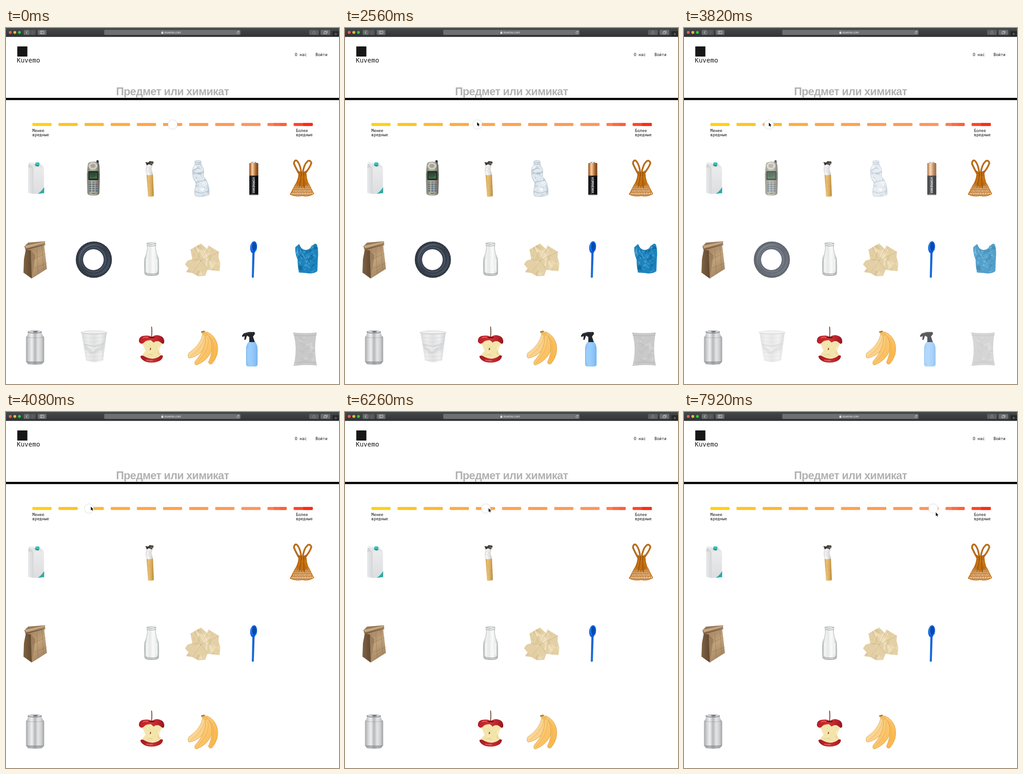
An HTML page with a canvas that plays this animation: 724 by 773 pixels, repeating every 8000 ms.

```html
<!DOCTYPE html>
<html lang="ru">
<head>
<meta charset="utf-8">
<title>Kuvemo</title>
<style>
html, body { margin: 0; width: 100%; height: 100%; overflow: hidden; background: #fff; }
canvas { display: block; width: 724px; height: 773px; }
</style>
</head>
<body>
<canvas id="stage"></canvas>
<script>
const W = 724, H = 773, LOOP = 8000;
const SANS = '"Liberation Sans", sans-serif';
const MONO = '"DejaVu Sans Mono", monospace';
const ratio = window.devicePixelRatio || 1;
const stage = document.getElementById('stage');
let g;

function prepare(canvas) {
  canvas.width = W * ratio;
  canvas.height = H * ratio;
  const ctx = canvas.getContext('2d');
  ctx.scale(ratio, ratio);
  return ctx;
}

function layer(...painters) {
  const canvas = document.createElement('canvas');
  g = prepare(canvas);
  painters.forEach(paint => paint());
  return canvas;
}

// Drawing helpers
const fill = (d, color) => { g.fillStyle = color; g.fill(new Path2D(d)); };
const line = (d, color, width = 1) => {
  g.strokeStyle = color;
  g.lineWidth = width;
  g.lineCap = g.lineJoin = 'round';
  g.stroke(new Path2D(d));
};
const box = (x, y, w, h, r, color) => {
  g.fillStyle = color;
  g.beginPath();
  g.roundRect(x, y, w, h, r);
  g.fill();
};
const oval = (x, y, rx, ry, color, turn = 0) => {
  g.fillStyle = color;
  g.beginPath();
  g.ellipse(x, y, rx, ry, turn, 0, 7);
  g.fill();
};
const text = (s, x, y, font, color, align = 'left', spacing = 0) => {
  g.font = font;
  g.fillStyle = color;
  g.textAlign = align;
  g.letterSpacing = spacing + 'px';
  g.fillText(s, x, y);
  g.letterSpacing = '0px';
};
const blend = (x0, y0, x1, y1, ...colors) => {
  const grad = g.createLinearGradient(x0, y0, x1, y1);
  colors.forEach((c, i) => grad.addColorStop(i / (colors.length - 1), c));
  return grad;
};
const across = (x0, x1, ...colors) => blend(x0, 0, x1, 0, ...colors);
const down = (y0, y1, ...colors) => blend(0, y0, 0, y1, ...colors);

function inside(d, paint) {
  g.save();
  g.clip(new Path2D(d));
  paint();
  g.restore();
}

function random(seed) {
  return () => (seed = (seed * 16807) % 2147483647) / 2147483647;
}

// Fills a shape and scatters soft folds over it
function crumple(d, base, [x, y, w, h], folds, count, seed, size = 16) {
  const rnd = random(seed);
  fill(d, base);
  inside(d, () => {
    for (let i = 0; i < count; i++) {
      const cx = x + rnd() * w, cy = y + rnd() * h;
      const p = () => (rnd() - .5) * size;
      fill(`M${cx} ${cy}l${p()} ${p()}l${p()} ${p()}l${p()} ${p()}z`, folds[i % folds.length]);
    }
  });
}

// Page
function browser() {
  box(0, 0, W, 19, 0, down(0, 19, '#45494a', '#303435'));
  box(0, 18.4, W, .8, 0, '#17191a');
  ['#fc5b57', '#e5bf3c', '#34c748'].forEach((c, i) => oval(9.2 + i * 10, 9.6, 3.1, 3.1, c));
  const key = '#686c6d', ink = '#e8e9e9', dim = '#8d9091';
  box(38.5, 4, 13, 11, 2, key);
  box(52, 4, 12.5, 11, 2, '#535758');
  box(69, 4, 19, 11, 2, key);
  line('M46 7l-2.4 2.5L46 12', ink);
  line('M57.2 7l2.4 2.5L57.2 12', '#777b7c', .9);
  line('M75 6.8h7.5v5.4H75zM77.7 6.8v5.4', ink, .8);
  box(213.5, 4, 296.5, 11, 2, '#6c7071');
  box(337.8, 9, 4.4, 3.4, .6, ink);
  line('M338.7 9V8a1.3 1.3 0 0 1 2.6 0v1', ink, .7);
  text('kuvemo.com', 344.5, 11.8, '6.3px ' + SANS, '#f2f2f2');
  line('M506.2 8.2a2.4 2.4 0 1 0 .6 1.6M506.5 6.5v1.9h-1.9', ink, .7);
  box(659, 4, 21, 11, 2, '#5c6061');
  box(684, 4, 21, 11, 2, key);
  line('M668 8.5h-1.5v4h6v-4H671M669.5 10.5V6.3M668.2 7.4l1.3-1.2 1.3 1.2', dim, .7);
  line('M691.5 8.5h5v4h-5zM693.5 8V6.8h5v4h-1', ink, .7);
  box(710, 7, 14, 12, 0, '#26292a');
  line('M717 10.3v5.4M714.3 13h5.4', '#8b8e8f', .8);
}

function page() {
  const label = '500 8.6px ' + MONO;
  box(24.5, 40, 22, 22, 0, '#171717');
  text('Kuvemo', 23.5, 75, '14px ' + MONO, '#1c1c1c');
  text('О нас', 628, 61, label, '#111');
  text('Войти', 673, 61, label, '#111');
  text('Предмет или химикат', 362, 146, 'bold 24px ' + SANS, '#b1b1b1', 'center', -.7);
  box(0, 151.7, W, 4.8, 0, '#000');
  const tones = ['#ffd016', '#fcc425', '#fab834', '#fbac42', '#fba64b', '#fba251',
    '#fb9d55', '#fa9b59', '#fb965e', '#fb7c50', '#fb4427'];
  tones.forEach((c, i) => box(57.3 + i * 56.8, 206.2, 41.8, 6.5, 1.6, c));
  box(582, 206.2, 14, 6.5, 0, '#fa6b43');
  box(596, 206.2, 14.3, 6.5, [0, 1.6, 1.6, 0], '#fc5f39');
  box(646, 206.2, 21.1, 6.5, [0, 1.6, 1.6, 0], '#fb2c15');
  text('Менее', 57.3, 226, label, '#111');
  text('вредные', 57.3, 234.8, label, '#111');
  text('Более', 630.5, 226, label, '#111');
  text('вредные', 630.5, 234.8, label, '#111');
}

// Objects
function carton() {
  fill('M48 303L60 304V360.5L48 358Z', across(48, 60, '#e9eaeb', '#d4d6d8'));
  fill('M60 304L82.5 302.5V358.5L60 360.5Z', down(303, 360, '#ebebec', '#dcdddf'));
  fill('M50 292.5L60 304L48 303Z', '#d0d2d4');
  fill('M50 294L75 295L82.5 302.5L60 304Z', '#e3e4e6');
  fill('M49.5 291L62 292V295L50 294.5Z', '#f0f0f1');
  fill('M83 345.5V358.5L69 360Q77 355 83 345.5Z', '#2eaaa3');
  oval(67.8, 297, 4.6, 3.4, '#188e88', .2);
  box(63.8, 291.8, 9, 6, 2.4, '#3dc0b6');
}

function phone() {
  box(196.5, 287, 5, 15, 2.2, '#2c333d');
  fill('M178 296Q179 290 190 290Q202 290 203 298L204 319L203 359Q202 364 190 364Q178 364 177 359L176 318Z',
    across(176, 204, '#77786e', '#b4b3a4', '#a5a497', '#5e6059'));
  oval(189, 299.5, 9.8, 7.8, '#d3d1c4');
  oval(189, 299.5, 6.4, 5, '#b6b4a6');
  for (let i = 0; i < 9; i++) oval(186.5 + i % 3 * 2.5, 297.5 + (i / 3 | 0) * 2, .6, .6, '#5a5b55');
  box(179, 310.5, 22, 20, 2.5, '#25292a');
  box(181.5, 313.5, 17, 13.5, 1, down(313, 327, '#28482f', '#46704b'));
  line('M183.5 317h10M183.5 320h12M183.5 323h8', '#183620', .8);
  for (let i = 0; i < 15; i++) {
    const row = i / 3 | 0;
    const c = row ? '#4c5d6d' : ['#4d7e5c', '#56708a', '#b2504a'][i];
    oval(183 + i % 3 * 7, 334.5 + row * 4.7, 2.5, 1.6, c);
    oval(183 + i % 3 * 7, 334 + row * 4.7, 1.2, .5, '#a9b7c1');
  }
  box(186, 358.5, 8, 1.5, .7, '#5f6058');
}

function cigarette() {
  fill('M305.5 318L319.5 318L321.5 365Q315 367 309 366Z', across(305, 321, '#cf9f50', '#e8c078', '#dcae60', '#b98a3e'));
  const rnd = random(7);
  for (let i = 0; i < 30; i++) box(308 + rnd() * 11, 322 + rnd() * 41, 1, 1, 0, '#b7873f80');
  fill('M305 297L319 296L316.5 306L319.5 318Q312 321 305.5 319L303.5 308Z', across(303, 319, '#d2d3d6', '#f7f7f8', '#e5e6e7', '#c6c8cb'));
  line('M307 302l7 4-5 4 7 5', '#c9cbce', .8);
  crumple('M303 291L309 292L312 289L320 290L321 293L317 298L311 296L306 298Z', '#45403d',
    [303, 288, 18, 11], ['#1c1917', '#8e8783', '#c6c0bb', '#635248'], 24, 12, 6);
}

function crushed() {
  const d = 'M411 289Q417 286 424 289L424 297Q430 303 430 312L429 322L436 331Q443 345 441.5 362Q427 368 412 365Q408 357 412 345L413 336L407 326Q404 311 407 303L411 297Z';
  crumple(d, '#dfe7ee', [404, 292, 38, 74], ['#ffffffb0', '#b8c5d080', '#edf3f7c0', '#94a8b860'], 80, 31, 16);
  line(d, '#a9b8c5', .8);
  line('M411 292h13M411 296h13M407 313l12 3 11-4M413 336l20-6M411 355l14 4 16-6', '#8da1b1', .8);
}

function battery() {
  box(533.5, 290.5, 10.5, 5, 1.5, across(533, 544, '#777', '#e9e9e9', '#888'));
  box(529, 293, 19.5, 30, [2, 2, 0, 0], across(529, 548, '#8a5024', '#c98347', '#f6cfa6', '#e3a873', '#b67840', '#8f5525', '#7a4218'));
  box(529, 320.5, 19.5, 42.5, [0, 0, 2, 2], across(529, 548, '#0b0b0c', '#2a2b2e', '#111214', '#050505'));
  box(530, 361, 17.5, 2, 1, '#77797b');
  g.save();
  g.translate(536.3, 323.5);
  g.rotate(Math.PI / 2);
  text('VORNEMIX', 0, 0, 'bold 6.6px ' + SANS, '#f4f4f4');
  g.restore();
}

function net() {
  const body = 'M636 310Q644 316 653 309Q653 327 658 338L669 360Q657 367 644 364Q630 367 618 361L630 338Q637 325 636 310Z';
  const dark = '#96500b', warm = '#cb7615';
  const loops = 'M637 316Q629 302 626 294Q627 286 632 288Q640 295 642 316M650 316Q661 303 664 293Q662 286 656 289Q647 297 645 316';
  line(loops, dark, 3.6);
  line(loops, warm, 2);
  inside(body, () => {
    fill('M635 308H654V326L658 338L644 346L631 338Z', '#b0620f');
    for (let i = -14; i <= 14; i++) {
      line(`M${644 + i * 4} 366L${644 + i * 1.6 + 12} 322`, dark, 1.3);
      line(`M${644 + i * 4} 366L${644 + i * 1.6 - 12} 322`, warm, 1.3);
    }
    line('M639 310Q641 326 632 344M645 312Q644 330 643 348M650 310Q648 326 656 344', warm, 1.8);
    line('M642 312Q642 328 637 346M648 312Q646 330 649 348', dark, 1.2);
  });
  line('M630 338L618 361Q630 367 644 364Q657 367 669 360L658 338', warm, 1.6);
}

function paperBag() {
  fill('M43 481L83 472L89 523L56 544L38 531Z', blend(45, 480, 88, 530, '#a48260', '#c0a27c', '#a3835f'));
  fill('M43 481L54 483L56 544L38 531L39 502Z', blend(39, 500, 57, 500, '#7d6142', '#5f472f'));
  fill('M54 483L64 494L56 544Z', '#8a6c4a90');
  line('M67 480L70 534M58 502L86 490M60 522L88 511M78 474L82 526', '#7a5d3e66', 1);
  fill('M40 474L48 466L85 463L85 470L46 482L42 481Z', '#97785a');
  fill('M41 473L85 463.5L84 467L44 478Z', '#c5a881');
  line('M43 481L85 471', '#5b4229', 1);
}

function tire() {
  oval(191, 503, 39.3, 39.5, '#323943');
  for (let i = 0; i < 100; i++) {
    const a = i * Math.PI / 50, c = Math.cos(a), s = Math.sin(a);
    line(`M${191 + c * 36} ${503 + s * 36}L${191 + c * 38.5} ${503 + s * 38.5}`, i % 2 ? '#262c35' : '#424a55', 1);
  }
  oval(192, 503, 34.5, 35, blend(165, 475, 216, 532, '#566272', '#353d49', '#465161'));
  oval(191.5, 503, 29.5, 30, '#2f3743');
  oval(191, 503, 28, 28.5, '#465060');
  oval(190, 503, 24.6, 24.8, '#2b323d');
  oval(190, 503, 22.8, 23, '#d5d8dc');
  oval(190, 503, 21.6, 21.8, '#fff');
}

function glass() {
  const d = 'M306.5 467Q316 464 326 467L325 478Q326 490 331 499Q332.5 506 332 533Q331 538 317 538Q302 538 301.5 533Q300 507 302 499Q307 489 307.5 478Z';
  fill(d, across(301, 332, '#b9bdbe', '#f0f1f1', '#e7e9e9', '#fafafa', '#ecefef', '#b6bbbc'));
  line(d, '#9ba1a2', .8);
  line('M307 468Q316 471 325.5 468M307.5 472Q316 475 325 472', '#8b9192', 1);
  line('M306 501V528M328 502V527', '#ffffffcc', 2);
  line('M303 532Q317 536 331 532M304 535Q317 538 330 535', '#82898a', 1);
}

function crumpled() {
  const d = 'M410 476L424 468L437 480L440 472L463 486L462 497L466 512L464 528L438 525L433 538L418 539L405 532L391 530L397 522L389 513L395 505L405 502L401 481Z';
  crumple(d, '#e4d0a6', [390, 468, 75, 71], ['#efe0bcb0', '#d3bd9080', '#dcc799a0', '#f4e8c8a0', '#c2aa7a50'], 45, 44, 32);
  line('M410 476L424 505L405 502M424 505L463 486M424 505L438 525M424 505L405 532M437 480L424 505', '#b9a17280', .9);
}

function spoon() {
  fill('M535.6 486H540.4L538.8 541Q536.7 544 534.5 541Z', across(534, 540, '#0751c4', '#1d76ea', '#0649af'));
  oval(538.3, 476, 7.5, 13, blend(531, 470, 546, 480, '#176fe6', '#0756cb'), .12);
  oval(538.8, 474.5, 4.6, 9, '#0649b1', .12);
  line('M535 468Q533 477 536 484', '#3d91fa', 1.1);
  oval(543.2, 485.2, 1.3, 1.8, '#d9ebff', .4);
}

function blueBag() {
  const d = 'M629 476L637 469Q642 482 651 482Q661 482 665 473L672 468L676 470Q680 485 678 500L677 528Q668 535 652 532L637 531Q634 518 634 503Q628 490 629 476Z';
  crumple(d, '#1d83bc', [628, 468, 52, 65], ['#49a8d9b0', '#0d649b90', '#2e95caa0', '#8acbeb60', '#0a568880'], 75, 71, 20);
  line('M637 470Q642 483 651 483Q661 483 665 473', '#0c5f96', 1);
}

function can() {
  const d = 'M48 659L77 659L79 666L83 672V724L78 730Q63 732 48 730L43.5 724V672L47 666Z';
  fill(d, across(43, 83, '#a4a6a8', '#cfd1d3', '#eeefef', '#b4b6b9', '#e4e5e6', '#cfd1d3', '#a2a4a7'));
  fill('M43.5 724H83L78 730Q63 732 48 730Z', '#85888b88');
  line('M44 671Q63 675 82 671M44 724Q63 728 82 724', '#8b8e91aa', .8);
  oval(62.5, 660, 15.5, 3.3, '#77797c');
  oval(62.5, 659.6, 14, 2.2, '#d4d6d8');
  oval(64, 659.6, 5, 1.1, '#4b4d50');
}

function cup() {
  const d = 'M164 661L219 661L211 722Q192 729 174 722Z';
  fill(d, across(164, 219, '#d8d9da', '#ececec', '#e0e1e2', '#efefef', '#d0d1d2'));
  inside(d, () => {
    fill('M169 684L191 691L214 681L210 700L184 708L172 697Z', '#c2c3c560');
    fill('M175 690L193 694L204 690L189 703Z', '#f6f6f6a0');
    for (let i = 0; i < 7; i++) line(`M166 ${671 + i * 8}Q190 ${677 + i * 8} 217 ${670 + i * 8}`, '#bcbec060', .9);
  });
  oval(191.5, 661, 28.8, 4.2, '#cbcccd');
  oval(191.5, 660.6, 27.2, 3, '#efefef');
}

function apple() {
  line('M316 674Q318 660 316.5 649', '#5e3923', 1.7);
  crumple('M291 681L304 675H332L343 683L336 691L333 702L340 714L318 719L293 714L303 701L299 690Z', '#f3e4ac',
    [291, 676, 52, 42], ['#fff4c9b0', '#e3c97a80', '#f8e9b4b0'], 40, 18, 14);
  fill('M289 681Q288 668 304 668Q311 667 317 671Q325 665 334 668Q345 671 344 683Q342 688 338 684Q329 676 321 683L315 678Q304 677 299 684Q293 688 289 681Z',
    blend(290, 668, 342, 684, '#b51a24', '#cf3638', '#981520'));
  oval(317, 672, 7, 1.8, '#77131b');
  fill('M292 713Q296 709 303 714Q311 718 319 718Q330 717 336 711Q342 710 341 714Q339 722 328 725Q317 728 305 725Q294 721 292 713Z',
    across(292, 341, '#9c1721', '#cb3034', '#a41a23'));
  line('M298 673Q304 670 308 672M305 721Q312 723 319 722', '#ef8c80', 1.2);
  oval(314, 697, 1.2, 2.6, '#80501f', .3);
}

function bananas() {
  const peel = (d, a, b) => { fill(d, blend(405, 680, 450, 715, a, b)); line(d, '#c79443', .7); };
  peel('M428 663Q424 688 397 706Q394 714 398 717Q420 714 434 692Q440 678 436 664Z', '#fddca0', '#fac26a');
  peel('M432 664Q440 690 411 724Q409 731 414 732Q440 722 448 698Q451 680 438 664Z', '#ffd28a', '#fabd58');
  peel('M434 661Q452 676 447 704Q444 718 440 726Q443 732 448 729Q463 711 460 690Q457 670 438 660Z', '#ffd080', '#fab94e');
  fill('M424 659L431 657L439 663L437 670L428 667Z', '#f0bd60');
  fill('M424 659L431 657L432 660L425 662Z', '#a87a3c');
  line('M432 670Q429 693 401 713M439 672Q445 697 415 728M443 670Q457 684 448 716', '#dca64d', .7);
}

function sprayer() {
  fill('M529 680H540Q547 687 547 696V730Q547 735 541 735H528Q522 735 522 730V696Q522 687 529 680Z',
    across(522, 547, '#82bdf3', '#9dcffd', '#8fc6fa', '#7ab5ee'));
  line('M526 697V727', '#b9dcfd', 1.2);
  fill('M513 668L517 663L528 660H540L541.5 664L537 670L541 682H529L529 671L524 668L521 677L518 677L519 669L514 671Z', '#23262a');
  line('M518 664.5L529 661.5H538', '#4c5157', .9);
}

function pouch() {
  const d = 'M624 661Q650 664 676 661L674 670Q670 696 674 722L676 733Q650 730 625 734L628 720Q632 694 627 671Z';
  crumple(d, '#c9c9ca', [624, 662, 52, 70], ['#dededf80', '#b9b9ba60', '#dededf60', '#b2b2b340'], 32, 53, 22);
  line('M626 667Q650 670 674 667M628 727Q650 724 673 727', '#b2b2b3', 1);
}

// Motion
const pointer = [[280, 671, 0], [420, 449, 179.3], [620, 449, 179.3], [1100, 362, 219], [1140, 362, 219],
  [1320, 362.5, 208.5], [1660, 362.5, 208.5], [1680, 363, 208.5], [2020, 363, 208.5], [2560, 287.5, 204.5],
  [2820, 260, 205], [3280, 191, 205.5], [3520, 184.5, 205.5], [5620, 184.5, 205.5],
  [6260, 312, 209], [6420, 374, 211], [7240, 532, 216], [7920, 547.5, 218]];
const knob = [[2020, 362.3], [2560, 288], [2820, 261], [3280, 192], [3520, 185.5], [3740, 185.5],
  [4080, 180.5], [5620, 180.5], [6260, 306], [6420, 369], [7240, 527], [7920, 542]];

// Monotone cubic through the keys, resting at turns and ends
function track(keys, t, k) {
  const last = keys.length - 1;
  if (t <= keys[0][0]) return keys[0][k];
  if (t >= keys[last][0]) return keys[last][k];
  const i = keys.findIndex(key => key[0] > t) - 1;
  const rate = j => (keys[j + 1][k] - keys[j][k]) / (keys[j + 1][0] - keys[j][0]);
  const slope = j => {
    if (j === 0 || j === last) return 0;
    const a = rate(j - 1), b = rate(j);
    return a * b > 0 ? 2 * a * b / (a + b) : 0;
  };
  const span = keys[i + 1][0] - keys[i][0], u = (t - keys[i][0]) / span, v = 1 - u;
  return keys[i][k] * v * v * (1 + 2 * u) + keys[i + 1][k] * u * u * (3 - 2 * u)
    + span * u * v * (slope(i) * v - slope(i + 1) * u);
}

function drawKnob(x) {
  g.save();
  g.shadowColor = 'rgba(0,0,0,.2)';
  g.shadowBlur = 2 * ratio;
  oval(x, 209.6, 10, 10, '#fff');
  g.restore();
  g.strokeStyle = '#dcdee0';
  g.lineWidth = .7;
  g.stroke();
}

function drawPointer(x, y) {
  const arrow = 'M0 0V7.9L1.8 6.2L3 9L4.3 8.4L3.1 5.7H5.6Z';
  g.save();
  g.translate(x, y);
  line(arrow, '#fff', 1.1);
  fill(arrow, '#000');
  g.restore();
}

const base = layer(browser, page, carton, cigarette, net, paperBag, glass, crumpled, spoon, can, apple, bananas);
const fading = layer(phone, crushed, battery, tire, blueBag, cup, sprayer, pouch);
const screen = prepare(stage);

function render(now) {
  const t = now % LOOP;
  g = screen;
  g.fillStyle = '#fff';
  g.fillRect(0, 0, W, H);
  g.drawImage(base, 0, 0, W, H);
  g.globalAlpha = Math.min(1, Math.max(0, (4080 - t) / 340));
  g.drawImage(fading, 0, 0, W, H);
  g.globalAlpha = 1;
  drawKnob(track(knob, t, 1));
  if (t >= 280) drawPointer(track(pointer, t, 1), track(pointer, t, 2));
}

const start = performance.now();
function tick() {
  render(performance.now() - start);
  requestAnimationFrame(tick);
}
tick();
</script>
</body>
</html>
```
